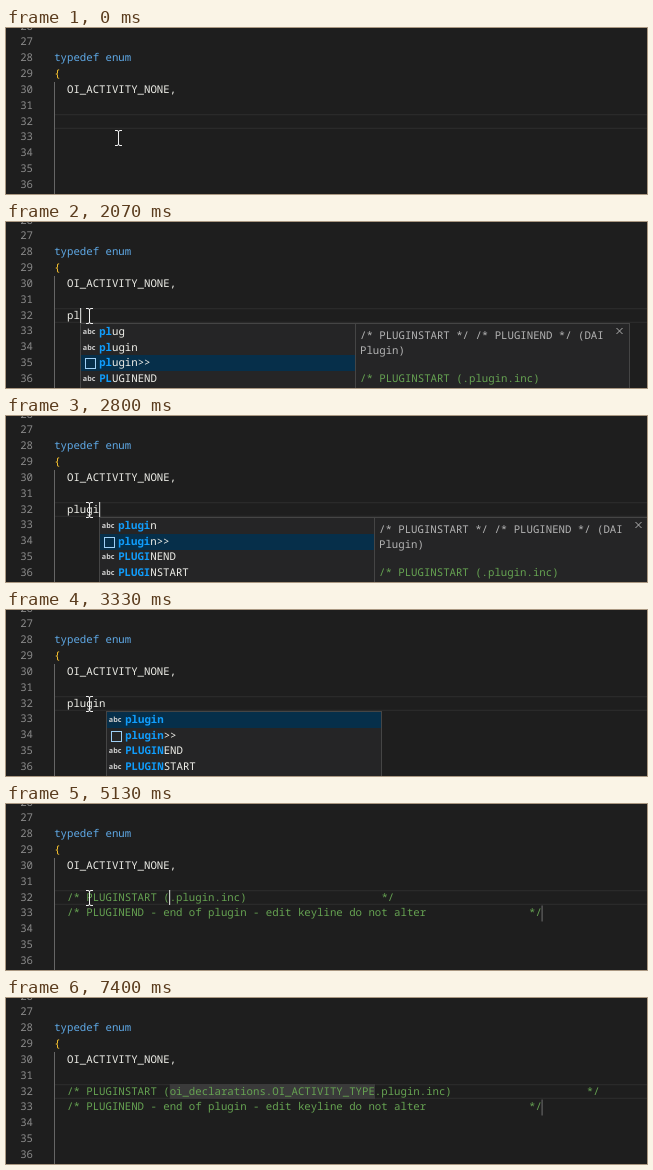
An HTML page that plays this animation: 641x166 px, repeating every 7940 ms.

```html
<!DOCTYPE html>
<html lang="en">
<head>
<meta charset="utf-8">
<title>Snippet completion in a code editor</title>
<style>
  html, body { margin: 0; width: 100%; height: 100%; overflow: hidden; background: #1e1e1e; }
  svg { display: block; width: 641px; height: 166px; }
  text {
    font: 500 10.694px "Noto Sans Mono", "DejaVu Sans Mono", monospace;
    fill: #f0f0ea;
    white-space: pre;
    text-rendering: geometricPrecision;
  }
  .num { fill: #8a8a8a; font-weight: 400; text-anchor: end; }
  .key { fill: #5fa9e6; }
  .brace { fill: #ffc830; }
  .note { fill: #66a352; }
  .match { fill: #109dfc; font-weight: 600; }
  .abc { font: bold 7.2px "Open Sans", sans-serif; fill: #d0d0d0; }
  .doc { fill: #b4b4b4; }
</style>
</head>
<body>
<svg viewBox="0 0 641 166" xmlns="http://www.w3.org/2000/svg">
  <g id="page"></g>
  <g id="code"></g>
  <rect id="caret" y="86" width="1.2" height="15" fill="#c8c9c7"/>
  <g id="popup"></g>
  <path id="mouse" fill="none" stroke="#f0f0f0"
    d="M-3.5-7.5h2Q0-7.5 0-6Q0-7.5 1.5-7.5h2M0-6V6M-3.5 7.5h2Q0 7.5 0 6Q0 7.5 1.5 7.5h2"/>
</svg>
<script>
const LOOP = 7940, LEFT = 48.2, ADV = 6.416, PITCH = 15.83;
const $ = id => document.getElementById(id);
const esc = s => s.replace(/>/g, '&gt;');
const base = n => Math.floor(97 + (n - 32) * PITCH);
const text = (x, y, s, cls = '') => `<text x="${x}" y="${y}" class="${cls}">${s}</text>`;
const rect = (x, y, w, h, fill, more = '') =>
  `<rect x="${x}" y="${y}" width="${w}" height="${h}" fill="${fill}" ${more}/>`;
const line = (n, col, s, cls) => text(LEFT + col * ADV, base(n), esc(s), cls);

function page() {
  let out = rect(48, 86, 593, 1.3, '#2a2a2a') + rect(48, 99.7, 593, 1.3, '#2a2a2a');
  for (let n = 26; n <= 36; n++) out += text(27, base(n), n, 'num');
  return out + rect(48, 54, 1, 112, '#666')
    + line(28, 0, 'typedef enum', 'key') + line(29, 0, '{', 'brace')
    + line(30, 2, 'OI_ACTIVITY_NONE,');
}

// Comment pair left by the snippet, with the typed file name
function snippet(name) {
  const w = name.length * ADV;
  return (name ? rect(163.7, 86, w, 15, '#3a3a3a') : '')
    + line(32, 2, `/* PLUGINSTART (${name}.plugin.inc)`, 'note')
    + line(32, 51 + name.length, '*/', 'note')
    + line(33, 2, '/* PLUGINEND - end of plugin - edit keyline do not alter', 'note')
    + line(33, 74, '*/', 'note')
    + rect(535.5, 101.5, 1.2, 16, '#626262');
}

function icon(x, y, word) {
  return word === 'plugin>>'
    ? rect(x + 5.5, y + 3.5, 10, 10, 'none', 'stroke="#9fd0f5"')
    : text(x + 2.8, y + 9.8, 'abc', 'abc');
}

function popup(x, typed, words, pick, docs, bar) {
  let out = rect(x + .5, 101.5, 275, 80, '#252526', 'stroke="#454545"');
  words.forEach((word, i) => {
    const y = Math.round(101.8 + i * PITCH), n = typed.length;
    if (i === pick) out += rect(x + 1, y, 274, 16, '#062f4a');
    out += icon(x, y, word) + text(x + 19.2, y + 11,
      `<tspan class="match">${word.slice(0, n)}</tspan>${esc(word.slice(n))}`);
  });
  if (!docs) return out;
  return out + rect(x + 275.5, 101.5, 274, 80, '#252526', 'stroke="#454545"')
    + (bar ? rect(x + 542, 101, 8, 65, '#4b4b4c') : '')
    + text(x + 280, 117, '/* PLUGINSTART */ /* PLUGINEND */ (DAI', 'doc')
    + text(x + 280, 132, 'Plugin)', 'doc')
    + text(x + 280, 160, '/* PLUGINSTART (.plugin.inc)', 'note')
    + `<path d="M${x + 536.5} 106l6 6m0-6l-6 6" stroke="#b0b0b0"/>`;
}

const words = ['plug', 'plugin', 'plugin>>', 'PLUGINEND'];
const longer = ['plugin', 'plugin>>', 'PLUGINEND', 'PLUGINSTART'];
const typed = s => line(32, 2, s);
const empty = snippet('');
const named = snippet('oi_declarations.OI_ACTIVITY_TYPE');

// [start, caret x (0 = hidden), code, popup]
const states = [
  [0, 0, '', ''], [670, 61, '', ''], [1070, 0, '', ''], [1600, 61, '', ''],
  [1800, 68, typed('p'), ''],
  [1870, 68, typed('p'), popup(68, 'p', words, 2)],
  [1930, 68, typed('p'), popup(68, 'p', words, 2, true)],
  [2070, 74, typed('pl'), popup(74, 'pl', words, 2, true)],
  [2130, 74, typed('pl'), popup(74, 'pl', words, 2, true, true)],
  [2270, 80, typed('plu'), popup(80, 'plu', words, 2, true)],
  [2330, 80, typed('plu'), popup(80, 'plu', words, 2, true, true)],
  [2530, 87, typed('plug'), ''],
  [2800, 93, typed('plugi'), popup(93, 'plugi', longer, 1, true)],
  [2870, 100, typed('plugin'), popup(100, 'plugin', longer, 0)],
  [3330, 0, typed('plugin'), popup(100, 'plugin', longer, 0)],
  [3800, 0, typed('plugin'), popup(100, 'plugin', longer, 1, true)],
  [3870, 100, typed('plugin'), popup(100, 'plugin', longer, 1, true)],
  [4130, 163, empty, ''], [4600, 0, empty, ''], [5130, 163, empty, ''], [5600, 0, empty, ''],
  [5930, 369, named, ''], [6400, 0, named, ''], [6930, 369, named, ''], [7400, 0, named, '']
];

// [start, x, y] of the pointer
const moves = [
  [0, 112, 110], [70, 104, 106], [130, 95, 102],
  [270, 90, 100], [330, 85, 98], [400, 81, 97], [470, 79, 96],
  [870, 81, 95], [930, 83, 94],
  [6930, 83, 96], [7000, 84, 100], [7070, 86, 107], [7130, 89, 116],
  [7200, 93, 127], [7270, 98, 140], [7330, 104, 153], [7400, 104, 200]
];

const at = (list, t) => list.findLast(e => e[0] <= t);
let shown;

function draw(t) {
  const state = at(states, t), [, x, y] = at(moves, t);
  $('mouse').setAttribute('transform', `translate(${x + .5} ${y})`);
  if (state === shown) return;
  shown = state;
  const [, caret, code, list] = state;
  $('code').innerHTML = code;
  $('popup').innerHTML = list;
  $('caret').setAttribute('x', caret || -9);
}

$('page').innerHTML = page();
const start = performance.now();
function tick() {
  draw((performance.now() - start) % LOOP);
  requestAnimationFrame(tick);
}
tick();
</script>
</body>
</html>
```
